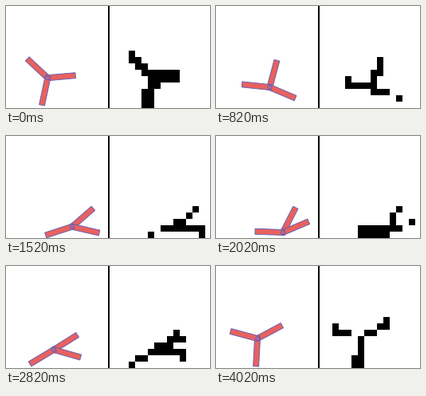
A matplotlib script that plays this animation: 256 by 128 pixels, repeating every 4.06 s.

```python
import numpy as np
import matplotlib.pyplot as plt
from matplotlib.animation import FuncAnimation
from matplotlib.patches import Circle, Polygon, Rectangle

W, H, CELL, N = 256, 128, 8, 16
STEP, FRAMES = 20, 203
REACH, BACK, HALF = 35, 2, 3.5
FILL, EDGE, JOINT = "#e8615f", "#5f5fb4", "#b5688f"

# time in ms, hub x, hub y, angles of the three arms in degrees
POSES = np.array([
    (0, 52.3, 90.2, 137, 5, -102),
    (540, 62, 97, 95, -22, -158),
    (820, 67.4, 102, 75, -23, -186),
    (1080, 75, 111, 53, -18, -168),
    (1520, 83, 113.8, 41, -13, -162),
    (2020, 84, 121, 63, 23, -182),
    (2160, 80, 119, 54, 15, -176),
    (2700, 61, 108, 36, -16, -154),
    (2820, 60, 105, 32, -16, -149),
    (3060, 59, 113, 74, -10, -162),
    (3380, 55.6, 121, 68, -5, -175),
    (3700, 54, 98.5, 42, -50, -187),
    (4020, 52, 91, 28, -93, -195),
])
T, P = POSES[:, 0], POSES[:, 1:]


def slopes():
    """Monotone tangents: zero at turning points, harmonic mean elsewhere."""
    d = np.diff(P, axis=0) / np.diff(T)[:, None]
    a, b = d[:-1], d[1:]
    same = a * b > 0
    inner = np.where(same, 2 * a * b / np.where(same, a + b, 1), 0)
    return np.vstack([d[:1], inner, d[-1:]])


M = slopes()


def pose(t):
    k = min(np.searchsorted(T, t, side="right") - 1, len(T) - 2)
    h = T[k + 1] - T[k]
    u = (t - T[k]) / h
    return ((1 + 2 * u) * (1 - u) ** 2 * P[k] + u * (1 - u) ** 2 * h * M[k]
            + u * u * (3 - 2 * u) * P[k + 1] + u * u * (u - 1) * h * M[k + 1])


def bar(hub, deg):
    a = np.radians(deg)
    along = np.array([np.cos(a), -np.sin(a)])
    side = HALF * np.array([np.sin(a), np.cos(a)])
    tip, root = hub + REACH * along, hub - BACK * along
    return np.array([root + side, tip + side, tip - side, root - side])


def body(t):
    x, y, *angles = pose(t)
    hub = np.array([x, y])
    bars = [bar(hub, a) for a in angles]
    lift = np.array([0, max(0, max(b[:, 1].max() for b in bars) - 127.9)])
    return hub - lift, [b - lift for b in bars]


def scan_fill(grid, pts):
    """Fill a polygon snapped to grid cells, one scanline at a time."""
    v = np.floor(pts / CELL).astype(int)
    for row in range(max(v[:, 1].min(), 0), min(v[:, 1].max(), N - 1) + 1):
        xs = []
        for (x0, y0), (x1, y1) in zip(v, np.roll(v, -1, axis=0)):
            if y0 == y1 == row:
                xs += [x0, x1]
            elif y0 != y1 and min(y0, y1) <= row <= max(y0, y1):
                xs.append(x0 + (row - y0) * (x1 - x0) / (y1 - y0))
        lo = int(np.floor(min(xs) + 0.5))
        hi = int(np.ceil(max(xs) - 0.5))
        grid[row, max(lo, 0):max(hi + 1, 0)] = 0


fig = plt.figure(figsize=(W / 100, H / 100), dpi=100, facecolor="white")
ax = fig.add_axes([0, 0, 1, 1])
ax.axis("off")

view = ax.imshow(np.ones((N, N)), cmap="gray", vmin=0, vmax=1,
                 extent=(130, 130 + N * CELL, H, 0),
                 interpolation="nearest", aspect="auto")
ax.add_patch(Rectangle((128, 0), 2, H, fc="black", lw=0, antialiased=False))
arms = [ax.add_patch(Polygon(np.zeros((4, 2)), fc=FILL, ec=EDGE, lw=0.65))
        for _ in range(3)]
joint = ax.add_patch(Circle((0, 0), 2.5, fc=JOINT, ec=EDGE, lw=0.6))
ax.set_xlim(0, W)
ax.set_ylim(H, 0)


def update(i):
    hub, bars = body(min(i * STEP, T[-1]))
    grid = np.ones((N, N))
    for arm, pts in zip(arms, bars):
        arm.set_xy(pts)
        scan_fill(grid, pts)
    joint.center = hub
    view.set_data(grid)
    return [view, *arms, joint]


anim = FuncAnimation(fig, update, frames=FRAMES, interval=STEP,
                     repeat=True, repeat_delay=0)
plt.show()
```
